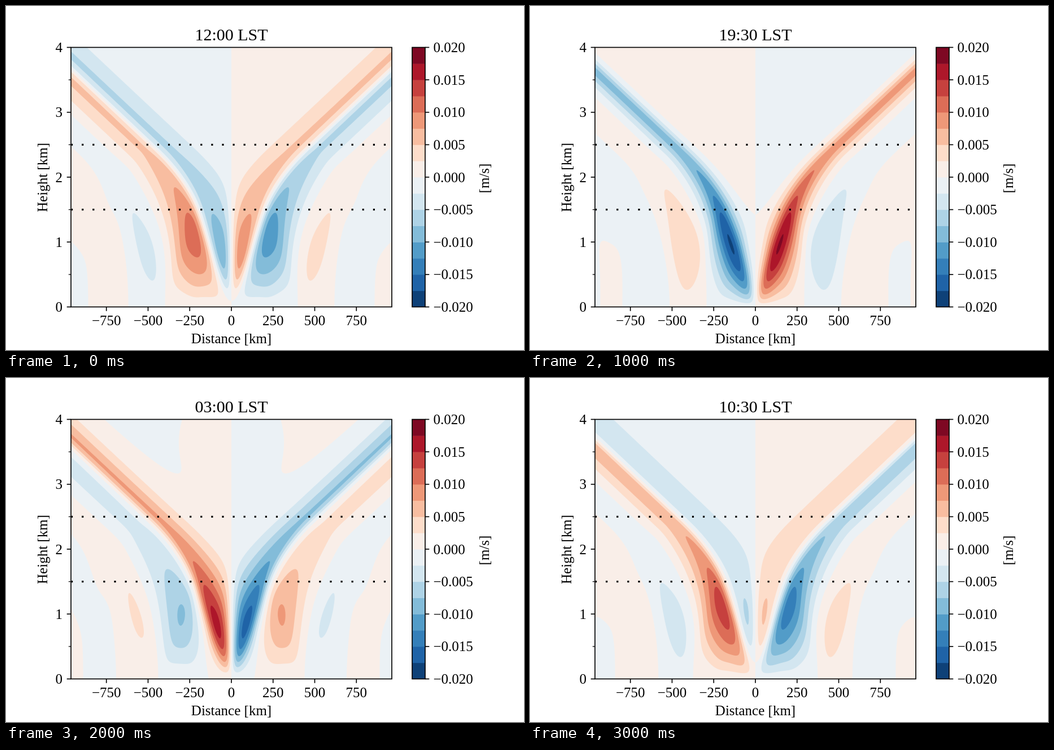
Animation of 917 by 611 pixels, one loop 3.2 s. Source, as an HTML page with a canvas:

```html
<!DOCTYPE html>
<html lang="en">
<head>
<meta charset="utf-8">
<title>Diurnal vertical velocity</title>
<style>
  html, body { margin: 0; width: 100%; height: 100%; overflow: hidden; background: #fff; }
  canvas { position: absolute; left: 115px; top: 73px; }
  svg { position: absolute; left: 0; top: 0; }
  text { font: 25px "Liberation Serif", "Times New Roman", Times, serif; fill: #000; }
  .title { font-size: 30px; }
</style>
</head>
<body>
<canvas id="field" width="568" height="462"></canvas>
<svg id="axes" width="917" height="611" viewBox="0 0 917 611"></svg>
<script>
// Plot geometry in pixels
const LEFT = 115, RIGHT = 683, TOP = 73.5, BOTTOM = 534.5, MID = 399;
const PX_PER_KM_Z = (BOTTOM - TOP) / 4;
const HALF = MID - LEFT, ROWS = 462;

// Linear wave response to diurnal heating; heights are scaled by 1 km
const OMEGA = 2 * Math.PI / 86400;
const N_LOW = 0.01, N_HIGH = 0.03;
const COAST = 50;
const FORCING = 1.2e-5 / (Math.PI * OMEGA * OMEGA);
const X_MAX = 7 * N_LOW / OMEGA;
const KM_PER_PX = X_MAX / HALF;
const LEVEL = 0.0025, BINS = 16;
const FRAME_MS = 200, FRAMES = 16;

// Stability rises linearly between 1.5 and 2.5 km
function slope(z) {
  const f = Math.min(1, Math.max(0, z - 1.5));
  return (N_LOW + f * (N_HIGH - N_LOW)) / OMEGA;
}

// In-phase and out-of-phase parts of the velocity for x > 0, in contour steps
function solve() {
  const sub = 2, steps = (ROWS - 1) * sub, h = 1 / (PX_PER_KM_Z * sub);
  const dk = 0.0008, modes = 200;
  const re = new Float64Array(ROWS * HALF), im = new Float64Array(ROWS * HALF);
  const n2 = new Float64Array(steps + 1), heat = new Float64Array(steps + 1);
  for (let j = 0; j <= steps; j++) {
    n2[j] = slope(j * h) ** 2;
    heat[j] = Math.exp(-j * h);
  }
  const forced = new Float64Array(steps + 1), free = new Float64Array(steps + 1);
  const wave = new Float64Array(HALF);

  for (let q = 0; q < modes; q++) {
    const k = (q + 0.5) * dk, amp = FORCING * Math.exp(-k * COAST);
    free[1] = h;
    for (let j = 1; j < steps; j++) {
      const c = 2 - k * k * n2[j] * h * h;
      forced[j + 1] = c * forced[j] - forced[j - 1] - amp * heat[j] * h * h;
      free[j + 1] = c * free[j] - free[j - 1];
    }
    // Only upward radiation is allowed through the top
    const m2 = k * k * n2[steps];
    const er = 1 - m2 * h * h / 2, ei = Math.sqrt(1 - er * er);
    const rest = j => forced[j] + amp * heat[j] / (m2 + 1);
    const a = rest(steps), b = rest(steps - 1);
    const c = free[steps], d = free[steps - 1];
    const nr = er * b - a, ni = ei * b, dr = c - er * d, di = -ei * d;
    const mag = dr * dr + di * di;
    const cr = (nr * dr + ni * di) / mag, ci = (ni * dr - nr * di) / mag;

    for (let i = 0; i < HALF; i++) {
      wave[i] = -k * dk * Math.sin(k * (i + 0.5) * KM_PER_PX) / LEVEL;
    }
    for (let r = 0; r < ROWS; r++) {
      const f = free[r * sub], pr = forced[r * sub] + cr * f, pi = ci * f;
      for (let i = 0, o = r * HALF; i < HALF; i++, o++) {
        re[o] += pr * wave[i];
        im[o] += pi * wave[i];
      }
    }
  }
  return { re, im };
}

// Diverging blue to red scale, sampled at the middle of each bin
const anchors = ["053061", "2166ac", "4393c3", "92c5de", "d1e5f0", "f7f7f7",
  "fddbc7", "f4a582", "d6604d", "b2182b", "67001f"]
  .map(s => [0, 2, 4].map(i => parseInt(s.slice(i, i + 2), 16)));
const palette = Array.from({ length: BINS }, (_, i) => {
  const p = (i + 0.5) / BINS * 10, b = Math.floor(p);
  return anchors[b].map((v, c) => v + (anchors[b + 1][c] - v) * (p - b));
});
const bin = i => palette[Math.min(BINS - 1, Math.max(0, i + BINS / 2))];

const canvas = document.getElementById("field");
const ctx = canvas.getContext("2d");
const image = ctx.createImageData(2 * HALF, ROWS);
const { re, im } = solve();
const value = new Float64Array(ROWS * HALF);

// Fills one pixel, softening contour edges by the local gradient
function put(col, row, v, grad) {
  const edge = Math.round(v);
  const t = Math.min(1, Math.max(0, 0.5 + (v - edge) / grad));
  const lo = bin(edge - 1), hi = bin(edge);
  const o = (row * 2 * HALF + col) * 4;
  for (let c = 0; c < 3; c++) image.data[o + c] = lo[c] + (hi[c] - lo[c]) * t;
  image.data[o + 3] = 255;
}

function drawField(frame) {
  const phase = frame * 2 * Math.PI / FRAMES;
  const c = Math.cos(phase), s = Math.sin(phase);
  for (let o = 0; o < value.length; o++) value[o] = re[o] * c - im[o] * s;
  for (let r = 0; r < ROWS; r++) {
    for (let i = 0; i < HALF; i++) {
      const o = r * HALF + i, v = value[o];
      const gx = i < HALF - 1 ? value[o + 1] - v : v - value[o - 1];
      const gy = r < ROWS - 1 ? value[o + HALF] - v : v - value[o - HALF];
      const grad = Math.hypot(gx, gy) + 1e-9;
      put(HALF + i, ROWS - 1 - r, v, grad);
      put(HALF - 1 - i, ROWS - 1 - r, -v, grad);
    }
  }
  ctx.putImageData(image, 0, 0);
}

const svg = document.getElementById("axes");
function add(tag, attrs, label) {
  const el = document.createElementNS("http://www.w3.org/2000/svg", tag);
  for (const key in attrs) el.setAttribute(key, attrs[key]);
  if (label !== undefined) el.textContent = label;
  return svg.appendChild(el);
}
const line = (x1, y1, x2, y2, width = 1.67, extra = {}) =>
  add("line", { x1, y1, x2, y2, stroke: "#000", "stroke-width": width, ...extra });
const text = (x, y, label, anchor = "middle", extra = {}) =>
  add("text", { x, y, "text-anchor": anchor, ...extra }, label);
const frameBox = (x, width) => add("rect", {
  x, y: TOP, width, height: BOTTOM - TOP, fill: "none", stroke: "#000", "stroke-width": 1.67
});
const signed = (v, digits) => (v < 0 ? "\u2212" : "") + Math.abs(v).toFixed(digits);

function drawAxes() {
  const yOf = z => BOTTOM - z * PX_PER_KM_Z;
  for (const z of [1.5, 2.5]) {
    line(LEFT, yOf(z), RIGHT, yOf(z), 3.18, { "stroke-dasharray": "3.18 15.92" });
  }
  frameBox(LEFT, RIGHT - LEFT);
  for (let z = 0; z <= 4; z++) {
    line(LEFT - 7.3, yOf(z), LEFT, yOf(z));
    text(100, yOf(z) + 8.5, z, "end");
    if (z < 4) line(LEFT - 4.2, yOf(z + 0.5), LEFT, yOf(z + 0.5), 1.25);
  }
  for (let x = -750; x <= 750; x += 250) {
    const px = MID + x / KM_PER_PX;
    line(px, BOTTOM, px, BOTTOM + 7.3);
    text(px, 567, signed(x, 0));
  }
  text(MID, 599, "Distance [km]");
  text(0, 0, "Height [km]", "middle", { transform: "translate(73 304.5) rotate(-90)" });

  const barX = 719, barW = 23, step = (BOTTOM - TOP) / BINS;
  palette.forEach((rgb, i) => add("rect", {
    x: barX, y: BOTTOM - (i + 1) * step, width: barW, height: step + (i ? 0.5 : 0),
    fill: `rgb(${rgb.map(Math.round)})`
  }));
  frameBox(barX, barW);
  for (let i = 0; i <= BINS; i += 2) {
    const y = BOTTOM - i * step;
    line(barX + barW, y, barX + barW + 7.3, y);
    text(756.5, y + 8.5, signed((i - BINS / 2) * LEVEL, 3), "start");
  }
  text(0, 0, "[m/s]", "middle", { transform: "translate(855 306) rotate(-90)" });
}

drawAxes();
const title = text(MID, 61, "", "middle", { class: "title" });
const pad = n => String(n).padStart(2, "0");

let shown = -1;
function tick() {
  const frame = Math.floor(performance.now() / FRAME_MS) % FRAMES;
  if (frame !== shown) {
    shown = frame;
    const minutes = (720 + frame * 90) % 1440;
    title.textContent = `${pad(Math.floor(minutes / 60))}:${pad(minutes % 60)} LST`;
    drawField(frame);
  }
  requestAnimationFrame(tick);
}
tick();
</script>
</body>
</html>
```
